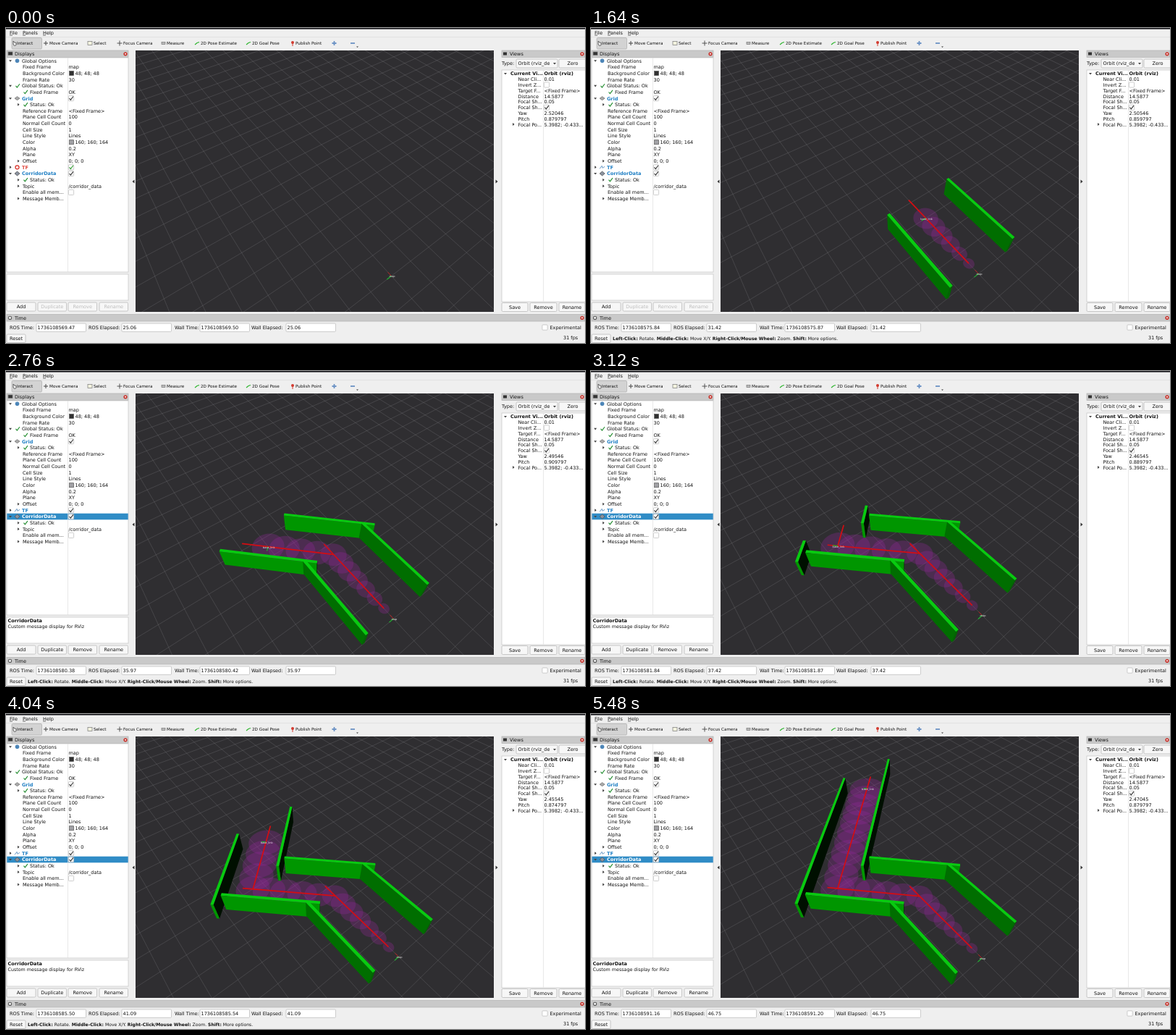
Recreate the animation shown at these times as an HTML page with a canvas. Size 800 by 435 pixels, loop 5.52 s.

```html
<!DOCTYPE html>
<html lang="en">
<head>
<meta charset="utf-8">
<title>Corridor view</title>
<style>
html, body { margin: 0; width: 100%; height: 100%; overflow: hidden; background: #efefef; }
#stage { position: relative; width: 800px; height: 435px; overflow: hidden; }
#ui, #view { position: absolute; left: 0; top: 0; }
#view { left: 179px; top: 31px; }
text { font: 6.5px "DejaVu Sans", sans-serif; fill: #111; white-space: pre; }
text.b, tspan.b { font-weight: bold; }
</style>
</head>
<body>
<div id="stage">
  <svg id="ui" width="800" height="435"></svg>
  <canvas id="view" width="495" height="361"></canvas>
</div>
<script>
(() => {
const LOOP = 5520, FRAME = 40;
const ui = document.getElementById('ui');
const ctx = document.getElementById('view').getContext('2d');

/* ---------- interface ---------- */
function add(tag, attrs, parent = ui) {
  const el = document.createElementNS('http://www.w3.org/2000/svg', tag);
  for (const k in attrs) el.setAttribute(k, attrs[k]);
  parent.appendChild(el);
  return el;
}
// y is the vertical middle of the text line
function text(x, y, str, o = {}, parent = ui) {
  const el = add('text', { x, y: y + 2.4, class: o.bold ? 'b' : '', 'text-anchor': o.mid ? 'middle' : 'start' }, parent);
  if (o.size) el.style.fontSize = o.size + 'px';
  if (o.fill) el.style.fill = o.fill;
  el.textContent = str;
  return el;
}
const rect = (x, y, width, height, fill, stroke = 'none', rx = 0) =>
  add('rect', { x, y, width, height, fill, stroke, rx, 'stroke-width': .7 });
const path = (d, stroke, w = 1, fill = 'none') => add('path', { d, stroke, 'stroke-width': w, fill });
const dot = (cx, cy, r, fill) => add('circle', { cx, cy, r, fill });
const tick = (x, y, color = '#1d8a2a') => path(`M${x - 2.5} ${y}l1.8 2.2l3.6 -4.8`, color, 1.1);
const arrow = (x, y, down) => path(down ? `M${x - 2} ${y - 1}h4l-2 2.6z` : `M${x - 1} ${y - 2}v4l2.6 -2z`, 'none', 0, '#444');
function checkbox(x, y, on) {
  rect(x - 3.6, y - 3.6, 7.2, 7.2, '#fff', '#b9b9b9', 1);
  return on && tick(x, y, '#333');
}
function button(x, y, w, h, label) {
  rect(x, y, w, h, '#f7f7f7', '#b4b4b4', 1.5);
  return text(x + w / 2, y + h / 2, label, { mid: 1 });
}
function title(x, y, w, label) {
  rect(x, y, w, 9.5, '#c9c9c9', '#b3b3b3');
  text(x + 11, y + 4.8, label);
  dot(x + w - 4, y + 4.8, 2.6, '#c8332c');
  dot(x + w - 4, y + 4.8, 1, '#fff');
}

rect(0, 0, 800, 435, '#efefef');
rect(0, 0, 800, 1.6, '#17171b');
[[5, 'File'], [23, 'Panels'], [51, 'Help']].forEach(([x, s]) => {
  text(x, 6.2, s);
  path(`M${x} 10h4`, '#111', .6);
});
path('M0 12.5H800', '#dcdcdc', .7);
rect(8, 13.5, 41.5, 15.5, '#d3d3d3', '#adadad', 1.5);
[[15, 'Interact'], [60, 'Move Camera'], [121, 'Select'], [162, 'Focus Camera'], [222, 'Measure'],
 [269, '2D Pose Estimate'], [340, '2D Goal Pose'], [400, 'Publish Point']]
  .forEach(([x, s]) => text(x, 21, s, { size: 5.7 }));
path('M10 18v5l2 1.5l2 -1v-3l-3 -1z', '#444', .8, '#eee');
path('M52 21h6M55 18v6', '#444', 1);
rect(113, 18.5, 6, 5, '#f4f4e0', '#777');
path('M153.5 21h7M157 17.5v7', '#444', .9);
rect(215, 19.5, 5, 3, '#bbb', '#777');
path('M261 23l3 -2.5l3 -1M332 23l3 -2.5l3 -1', '#2db52d', 1.2);
dot(396, 20, 2, '#d33a2f');
path('M396 21v4', '#d33a2f', 1);
path('M450.5 21h6M453.5 18v6', '#6d93c5', 1.8);
path('M476 21h6', '#6d93c5', 1.8);
path('M484 25.5h3l-1.5 1.6z', 'none', 0, '#333');

// Displays panel
title(1, 31, 168, 'Displays');
rect(3, 33, 6, 4.5, '#333', '#777');
rect(1, 41, 168, 296, '#fff', '#c4c4c4');
rect(1, 340, 168, 36, '#fff', '#c4c4c4');
const rowY = i => 45.2 + 8.655 * i;
const selected = rect(1.3, rowY(18) - 4.3, 167.4, 8.6, '#308cc6');
path('M85.5 41V337', '#dedede', .7);
const blue = '#1f7fc4';
const rows = [
  ['Global Options'], ['Fixed Frame', 'map'], ['Background Color', '48; 48; 48', '#303030'], ['Frame Rate', '30'],
  ['Global Status: Ok'], ['Fixed Frame', 'OK'], ['Grid'], ['Status: Ok'],
  ['Reference Frame', '<Fixed Frame>'], ['Plane Cell Count', '100'], ['Normal Cell Count', '0'], ['Cell Size', '1'],
  ['Line Style', 'Lines'], ['Color', '160; 160; 164', '#a0a0a4'], ['Alpha', '0.2'], ['Plane', 'XY'],
  ['Offset', '0; 0; 0'], ['TF'], ['CorridorData'], ['Status: Ok'],
  ['Topic', '/corridor_data'], ['Enable all mem...'], ['Message Memb...']
];
const roots = [0, 4, 6, 17, 18], displays = [6, 17, 18], passed = [5, 7, 19];
const rowText = rows.map(([name, value, swatch], i) => {
  const y = rowY(i);
  if (value) text(swatch ? 95.5 : 86.5, y, value);
  if (swatch) rect(87.5, y - 3, 6, 6, swatch, '#555');
  if (roots.includes(i)) arrow(6, y, i !== 17);
  if ([7, 16, 19, 20, 22].includes(i)) arrow(17, y);
  if (passed.includes(i)) tick(27, y);
  const x = passed.includes(i) ? 33 : roots.includes(i) ? 22 : 23;
  return text(x, y, name, displays.includes(i) ? { bold: 1, fill: blue } : {});
});
dot(15.5, rowY(0), 2.8, '#4d86b8');
tick(16, rowY(4));
path(`M12 ${rowY(6)}l3.5 -2.5l3.5 2.5l-3.5 2.5z`, '#777', .8, '#aaa');
path(`M12 ${rowY(18)}l3.5 -3l3.5 3l-3.5 3z`, '#555', .8, '#8b93a0');
const tfIcon = path(`M12 ${rowY(17) + 2}l3 -4l1 3l3 -2`, '#5b8fc0', .9);
const tfError = add('circle', { cx: 15.5, cy: rowY(17), r: 2.5, fill: '#fff', stroke: '#d9342b', 'stroke-width': 1.3 });
checkbox(90, rowY(6), true);
const tfTick = checkbox(90, rowY(17), true);
checkbox(90, rowY(18), true);
checkbox(90, rowY(21), false);
const about = add('g', {});
text(2.5, 345, 'CorridorData', { bold: 1 }, about);
text(2.5, 353, 'Custom message display for RViz', { size: 6.35 }, about);
button(1, 379, 40, 12, 'Add');
const editButtons = [[44, 'Duplicate'], [86, 'Remove'], [129, 'Rename']].map(([x, s]) => button(x, 379, 39.5, 12, s));
path('M177.5 209.5v5l-3 -2.5z', 'none', 0, '#333');
path('M676.5 209.5v5l3 -2.5z', 'none', 0, '#333');

// Views panel
title(685, 31, 115, 'Views');
rect(687, 33.5, 5, 4, '#333');
text(685, 49, 'Type:');
rect(705, 43, 57, 12, '#f7f7f7', '#b4b4b4', 1.5);
text(707.5, 49, 'Orbit (rviz_de');
path('M756 48h4l-2 2.5z', 'none', 0, '#444');
button(764, 43, 38, 12, 'Zero');
rect(685, 58, 118, 320, '#fff', '#c4c4c4');
path('M742.5 58V378', '#dedede', .7);
const viewY = i => 62.9 + 7.8 * i;
const viewRows = [['Current Vi...', 'Orbit (rviz)'], ['Near Cli...', '0.01'], ['Invert Z...'], ['Target F...', '<Fixed Frame>'],
  ['Distance', '14.5877'], ['Focal Sh...', '0.05'], ['Focal Sh...'], ['Yaw'], ['Pitch'], ['Focal Po...', '5.3982; -0.433...']];
const viewValue = viewRows.map(([name, value = ''], i) => {
  text(i ? 707.5 : 697, viewY(i), name, { bold: !i });
  return text(743.5, viewY(i), value, { bold: !i });
});
arrow(690, viewY(0), true);
arrow(701, viewY(9));
checkbox(747, viewY(2), false);
checkbox(747, viewY(6), true);
[[685, 36, 'Save'], [724, 37, 'Remove'], [764, 36, 'Rename']].forEach(([x, w, s]) => button(x, 379.5, w, 12, s));

// Time panel
title(1, 395.5, 799, 'Time');
dot(5.5, 400.3, 2.6, '#444');
dot(5.5, 400.3, 1.7, '#eee');
const clocks = [[5, 'ROS Time:', 42], [114, 'ROS Elapsed:', 160], [233, 'Wall Time:', 268], [339, 'Wall Elapsed:', 387]]
  .map(([x, label, field]) => {
    text(x, 413.5, label);
    rect(field, 408, 68.5, 11.3, '#fff', '#b9b9b9', 1);
    return text(field + 1.5, 413.5, '');
  });
checkbox(744.5, 413.5, false);
text(751.5, 413.5, 'Experimental');
text(770, 427.5, '31 fps');
button(1, 423, 26, 11.5, 'Reset');
const hint = text(30, 428.8, '', { size: 6.1 });
hint.innerHTML = '<tspan class="b">Left-Click:</tspan> Rotate. <tspan class="b">Middle-Click:</tspan> Move X/Y. ' +
  '<tspan class="b">Right-Click/Mouse Wheel:</tspan> Zoom. <tspan class="b">Shift:</tspan> More options.';

/* ---------- 3D view ---------- */
const DIST = 14.5877, LENS = 180.5 / Math.tan(Math.PI / 8), FOCUS = [5.3982, -.433, -.2];
const STEP = .5, SIDE = 1.5, THICK = .06, HEIGHT = 1, NEAR = .5;
let axes;
const dot3 = (a, b) => a[0] * b[0] + a[1] * b[1] + a[2] * b[2];

function aim(yaw, pitch) {
  const c = Math.cos(yaw), s = Math.sin(yaw), cp = Math.cos(pitch), sp = Math.sin(pitch);
  axes = { right: [-s, c, 0], up: [-sp * c, -sp * s, cp], back: [cp * c, cp * s, sp] };
}
function toCamera(p) {
  const q = p.map((v, i) => v - FOCUS[i]);
  return [dot3(q, axes.right), dot3(q, axes.up), DIST - dot3(q, axes.back)];
}
const toScreen = ([x, y, z]) => [247.5 + LENS * x / z, 180.5 - LENS * y / z];
const project = p => toScreen(toCamera(p));

function segment(a, b) {
  let p = toCamera(a), q = toCamera(b);
  if (p[2] < NEAR && q[2] < NEAR) return;
  if (p[2] > q[2]) [p, q] = [q, p];
  if (p[2] < NEAR) {
    const k = (NEAR - p[2]) / (q[2] - p[2]);
    p = p.map((v, i) => v + k * (q[i] - v));
  }
  ctx.moveTo(...toScreen(p));
  ctx.lineTo(...toScreen(q));
}
function stroke(pairs, color, width) {
  ctx.beginPath();
  pairs.forEach(([a, b]) => segment(a, b));
  ctx.strokeStyle = color;
  ctx.lineWidth = width;
  ctx.stroke();
}
function polygon(points, fill) {
  ctx.beginPath();
  points.forEach(p => ctx.lineTo(...project(p)));
  ctx.closePath();
  ctx.fillStyle = fill;
  ctx.fill();
}

const grid = [];
for (let i = -50; i <= 50; i++) grid.push([[i, -50, 0], [i, 50, 0]], [[-50, i, 0], [50, i, 0]]);

// straight on, then a left and a right bend of 45 degrees
function robotAt(n) {
  const left = Math.min(Math.max(n - 7, 0), 5), right = Math.max(n - 12, 0);
  return [n * STEP, (left - right) * STEP, 0];
}
const corridors = [{ first: 1, last: 6, turn: 0 }, { first: 7, last: 11, turn: 1 }, { first: 12, last: 99, turn: -1 }]
  .map(c => ({ ...c, dir: [Math.cos(c.turn * Math.PI / 4), Math.sin(c.turn * Math.PI / 4)] }));
const along = (p, dir, d) => [p[0] + dir[0] * d, p[1] + dir[1] * d, p[2]];

function face(points, normal) {
  const eye = axes.back.map((v, i) => FOCUS[i] + DIST * v - points[0][i]);
  if (dot3(eye, normal) <= 0) return;
  const light = Math.max(.06, -.4 * normal[0] + .43 * normal[1]);
  polygon(points, normal[2] ? '#08cb10' : `rgb(0,${Math.round(light * 255)},0)`);
}
function wall(a, b, [dx, dy]) {
  const left = [-dy, dx], lift = p => [p[0], p[1], HEIGHT];
  const base = [along(a, left, THICK), along(b, left, THICK), along(b, left, -THICK), along(a, left, -THICK)];
  const normals = [[-dy, dx, 0], [dx, dy, 0], [dy, -dx, 0], [-dx, -dy, 0]];
  base.forEach((p, i) => {
    const q = base[(i + 1) % 4];
    face([p, q, lift(q), lift(p)], normals[i]);
  });
  face(base.map(lift), [0, 0, 1]);
}
function disc(n) {
  const [x, y] = robotAt(n), r = .21 * Math.sqrt(n), ring = [];
  for (let a = 0; a < 6.28; a += .157) ring.push([x + r * Math.cos(a), y + r * Math.sin(a), 0]);
  polygon(ring, 'rgba(150,40,155,.29)');
}
function frameMark(p, [dx, dy], name) {
  stroke([[p, along(p, [dx, dy], .18)]], '#c02020', 1);
  stroke([[p, along(p, [-dy, dx], .22)]], '#20b030', 1.2);
  const [x, y] = project(p);
  ctx.font = '3.6px "DejaVu Sans", sans-serif';
  ctx.textAlign = 'center';
  ctx.fillStyle = '#e8e8e8';
  ctx.fillText(name, x + 1, y + 2);
}

function drawScene(n) {
  ctx.fillStyle = '#2f2e31';
  ctx.fillRect(0, 0, 495, 361);
  stroke(grid, 'rgba(160,160,164,.2)', 1);
  for (let i = 1; i <= n; i++) disc(i);
  const built = corridors.filter(c => n >= c.first);
  const end = c => robotAt(Math.min(n, c.last));
  built.forEach(c => stroke([[robotAt(c.first), along(end(c), c.dir, 1.16)]], '#d40d12', 1.7));
  frameMark([0, 0, 0], [1, 0], 'map');
  if (n) frameMark(robotAt(n), built[built.length - 1].dir, 'base_link');
  built.reverse().forEach(c => [-SIDE, SIDE].forEach(side => {
    const shift = ([x, y, z]) => [x, y + side, z];
    wall(shift(along(robotAt(c.first), c.dir, -STEP)), shift(along(end(c), c.dir, STEP)), c.dir);
  }));
}

/* ---------- timeline ---------- */
function track(keys, t) {
  const i = keys.findIndex(k => k[0] > t);
  if (i < 0) return keys[keys.length - 1][1];
  const [t0, a] = keys[i - 1], [t1, b] = keys[i];
  return a + (b - a) * (t - t0) / (t1 - t0);
}
const rosKeys = [[0, 569.47], [680, 571.963], [1640, 575.836], [2760, 580.383], [3520, 583.45], [4640, 587.87],
  [5480, 591.164], [5520, 591.32]];
// camera drags, counted in steps of 0.005 rad
const yawKeys = [[0, 0], [900, 0], [1500, 3], [2240, 3], [2640, 5], [2880, 5], [3440, 18], [3640, 18], [4280, 10]];
const pitchKeys = [[0, 0], [900, 0], [1500, -4], [2240, -4], [2640, 6], [2880, 6], [3440, -3], [3640, -3], [4280, 0]];
// the hint shows while the pointer is over the 3D view
const overView = t => (t >= 880 && t < 1840) || (t >= 2320 && t < 4840);

function render(ms) {
  const t = Math.floor((ms % LOOP) / FRAME) * FRAME;
  const ros = track(rosKeys, t), n = Math.max(0, Math.floor(ros - 569.9) + 1);
  const turns = Math.round(track(yawKeys, t));
  const yaw = 2.52046 - .005 * turns - (turns > 9 ? .00001 : 0);
  const pitch = .879797 + .005 * Math.round(track(pitchKeys, t));
  aim(yaw, pitch);
  drawScene(n);
  viewValue[7].textContent = yaw.toFixed(5);
  viewValue[8].textContent = pitch.toFixed(6);

  const elapsed = (ros - 544.412).toFixed(2);
  ['1736108' + ros.toFixed(2), elapsed, '1736108' + (ros + .034).toFixed(2), elapsed]
    .forEach((s, i) => clocks[i].textContent = s);

  const picked = t >= 2000, show = (el, on) => el.style.display = on ? '' : 'none';
  rowText[17].style.fill = n ? blue : '#e0463c';
  tfTick.setAttribute('stroke', n ? '#333' : '#2c9a2c');
  show(tfIcon, n > 0);
  show(tfError, !n);
  show(selected, picked);
  show(about, picked);
  rowText[18].style.fill = picked ? '#fff' : blue;
  editButtons.forEach(b => b.style.fill = picked ? '#111' : '#bdbdbd');
  show(hint, overView(t));
}

const start = performance.now();
function loop() {
  render(performance.now() - start);
  requestAnimationFrame(loop);
}
loop();
})();
</script>
</body>
</html>
```
